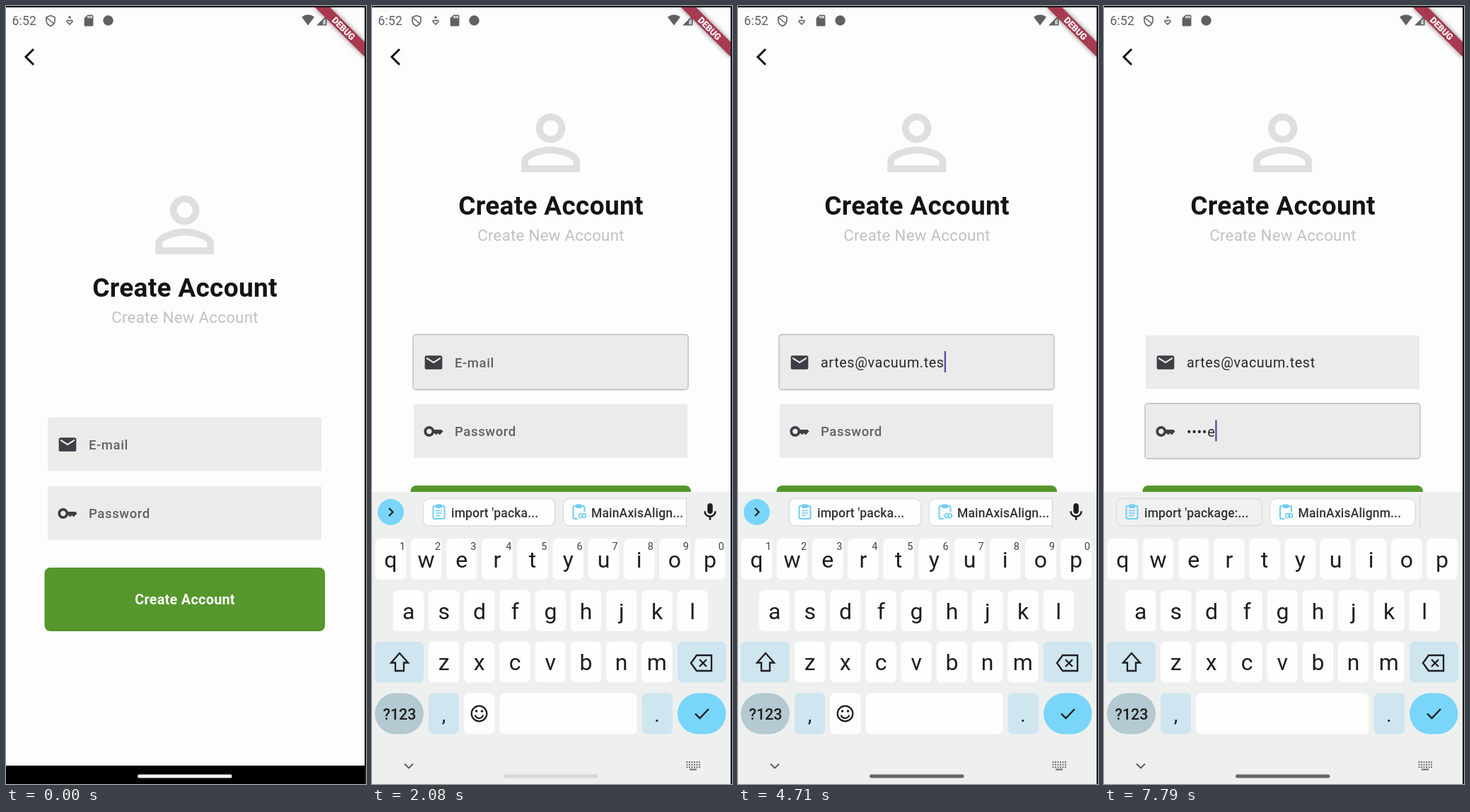
An HTML page with a canvas for the animation above (8 s loop, 509x1100 px).

```html
<!DOCTYPE html>
<html lang="en">
<head>
<meta charset="utf-8">
<title>Create Account</title>
<style>
  html, body { margin: 0; width: 100%; height: 100%; overflow: hidden; background: #fdfdfd; }
  canvas { display: block; }
</style>
</head>
<body>
<canvas id="stage" width="509" height="1100"></canvas>
<script>
const ctx = document.getElementById('stage').getContext('2d');
const LOOP = 8000, SHIFT = 116, KEYBOARD_TOP = 687;
const EMAIL = 'artes@vacuum.test';
const INK = '#1d1e20', BLUE = '#79d5fa', PALE = '#cfe5f0', KEY = '#fdfefd';

const ICONS = {
  person: 'M12 5.9a2.1 2.1 0 110 4.2 2.1 2.1 0 010-4.2m0 9c2.97 0 6.1 1.46 6.1 2.1v1.1H5.9V17c0-.64 3.13-2.1 6.1-2.1M12 4C9.79 4 8 5.79 8 8s1.79 4 4 4 4-1.79 4-4-1.79-4-4-4zm0 9c-2.67 0-8 1.34-8 4v3h16v-3c0-2.66-5.33-4-8-4z',
  mail: 'M20 4H4c-1.1 0-2 .9-2 2v12c0 1.1.9 2 2 2h16c1.1 0 2-.9 2-2V6c0-1.1-.9-2-2-2zm0 4l-8 5-8-5V6l8 5 8-5v2z',
  key: 'M21 10h-8.35C11.83 7.67 9.61 6 7 6c-3.31 0-6 2.69-6 6s2.69 6 6 6c2.61 0 4.83-1.67 5.65-4H13l2 2 2-2 2 2 4-4.04zM7 15c-1.65 0-3-1.35-3-3s1.35-3 3-3 3 1.35 3 3-1.35 3-3 3z',
  mic: 'M12 14c1.66 0 3-1.34 3-3V5c0-1.66-1.34-3-3-3S9 3.340 9 5v6c0 1.660 1.340 3 3 3zm5-3c0 2.760-2.240 5-5 5s-5-2.240-5-5H5c0 3.530 2.610 6.430 6 6.920V21h2v-3.080c3.390-.490 6-3.390 6-6.920z',
  card: 'M18 2h-8L4 8v12c0 1.100.9 2 2 2h12c1.100 0 2-.9 2-2V4c0-1.100-.9-2-2-2zm-6 6h-2V4h2zm3 0h-2V4h2zm3 0h-2V4h2z'
};
for (const name in ICONS) ICONS[name] = new Path2D(ICONS[name]);

const clamp = v => Math.min(1, Math.max(0, v));
const span = (t, from, to) => clamp((t - from) / (to - from));
const easeOut = p => 1 - (1 - p) ** 3;
const easeInOut = p => p * p * (3 - 2 * p);
const countReached = (times, t) => times.filter(at => t >= at).length;

function icon(name, cx, cy, scale, color) {
  ctx.save();
  ctx.translate(cx - 12 * scale, cy - 12 * scale);
  ctx.scale(scale, scale);
  ctx.fillStyle = color;
  ctx.fill(ICONS[name], 'evenodd');
  ctx.restore();
}

function box(x1, y1, x2, y2, r, fill, stroke, width = 1) {
  ctx.beginPath();
  ctx.roundRect(x1, y1, x2 - x1, y2 - y1, r);
  if (fill) { ctx.fillStyle = fill; ctx.fill(); }
  if (stroke) { ctx.strokeStyle = stroke; ctx.lineWidth = width; ctx.stroke(); }
}

function dot(x, y, r, color) {
  ctx.beginPath();
  ctx.arc(x, y, r, 0, Math.PI * 2);
  ctx.fillStyle = color;
  ctx.fill();
}

function line(points, color, width, close = false) {
  ctx.beginPath();
  points.forEach(([x, y]) => ctx.lineTo(x, y));
  if (close) ctx.closePath();
  ctx.strokeStyle = color;
  ctx.lineWidth = width;
  ctx.stroke();
}

function setFont(size, weight, spacing) {
  ctx.font = `${weight} ${size}px Roboto, sans-serif`;
  ctx.letterSpacing = spacing + 'px';
}

function text(str, x, y, size, color, { weight = 400, align = 'left', spacing = 0 } = {}) {
  setFont(size, weight, spacing);
  ctx.textAlign = align;
  ctx.fillStyle = color;
  ctx.fillText(str, x, y);
}

function statusBar() {
  const grey = '#5f6063';
  text('6:52', 8.5, 27, 17.5, grey, { spacing: .2 });
  ctx.strokeStyle = grey;
  ctx.lineWidth = 1.6;
  ctx.stroke(new Path2D('M63 13.500l6 2.300v5q0 5-6 7.700q-6-2.700-6-7.700v-5zM58 17l10 8'));
  ctx.stroke(new Path2D('M90 26l-4-4q0-3 4-1q4-2 4 1z'));
  dot(90, 16, 1.8, grey);
  icon('card', 117, 20.5, .8, grey);
  dot(144.500, 20.5, 7.2, grey);
  ctx.fillStyle = grey;
  ctx.fill(new Path2D('M418 15.500q9-6.500 18 0l-9 12z'));
  ctx.fill(new Path2D('M453.500 13v14.500h-14.500z'));
  ctx.fillStyle = '#c9c9cb';
  ctx.fill(new Path2D('M452 17v9h-4v-5z'));
  line([[39, 61], [28, 72], [39, 83]], '#111', 3);
}

function debugBanner() {
  ctx.save();
  ctx.beginPath();
  ctx.rect(0, 2, 507, 1098);
  ctx.clip();
  ctx.translate(507, 2);
  ctx.rotate(Math.PI / 4);
  ctx.shadowColor = 'rgba(0,0,0,.5)';
  ctx.shadowBlur = 7;
  ctx.fillStyle = '#a83a50';
  ctx.fillRect(-49.4, 34.6, 98.8, 14.8);
  ctx.shadowBlur = 0;
  text('DEBUG', 0, 46.5, 12.6, '#fff', { weight: 900, align: 'center' });
  ctx.restore();
}

function field({ top, bottom, iconName, hint, value, focus, caret }) {
  const mid = (top + bottom) / 2;
  box(59 - focus, top - focus, 446 + focus, bottom + focus, 2 + 2 * focus, '#ebebeb');
  if (focus) {
    ctx.globalAlpha = focus;
    box(58, top - 1, 447, bottom + 1, 4, null, '#b8b8c6', 1.3);
    ctx.globalAlpha = 1;
  }
  icon(iconName, 87, mid + .5, 1.234, '#3f3e45');
  if (value) text(value, 117, mid + 7.5, 19.75, '#28282b', { spacing: .62 });
  else text(hint, 117, mid + 7.300, 18.5, '#616064', { weight: 500, spacing: .62 });
  if (caret) {
    setFont(19.75, 400, .62);
    const x = 117 + (value ? ctx.measureText(value).width : 0);
    ctx.fillStyle = '#5c4fa2';
    ctx.fillRect(x, mid - 15.5, 2.4, 30);
  }
}

function form(t) {
  const emailTimes = [2420, 2600, 2800, 3040, 3420, 4080, 4080, 4080, 4080,
    4157, 4233, 4310, 4387, 4463, 4540, 4710, 4960];
  const typed = countReached([7040, 7290, 7630, 7710, 7790], t);
  const toPassword = span(t, 5880, 6050);

  ctx.save();
  ctx.translate(0, -SHIFT * easeInOut(span(t, 1860, 2040)));
  icon('person', 252.7, 309.5, 5.19, '#dfdfe0');
  text('Create Account', 253, 411, 37, '#141415', { weight: 700, align: 'center', spacing: .31 });
  text('Create New Account', 253, 448, 22.2, '#c1c1c4', { align: 'center', spacing: .31 });
  field({
    top: 581.500, bottom: 657.5, iconName: 'mail', hint: 'E-mail',
    value: EMAIL.slice(0, countReached(emailTimes, t)),
    focus: span(t, 1340, 1450) * (1 - toPassword),
    caret: (t >= 1380 && t < 1880) || (t >= 2420 && t < 5500)
  });
  field({
    top: 679, bottom: 755, iconName: 'key', hint: 'Password',
    value: typed ? '•'.repeat(typed - 1) + 'teste'[typed - 1] : '',
    focus: toPassword,
    caret: (t >= 5880 && t < 6380) || t >= 6880
  });
  box(54.5, 794, 451, 884, 8, '#55972c');
  text('Create Account', 253, 846, 19.75, '#fff', { weight: 700, align: 'center', spacing: .31 });
  ctx.restore();
}

function clipboard(x, linked) {
  box(x - 8, 707, x + 8, 725, 2, null, '#6fcdf3', 2);
  box(x - 4, 704.5, x + 4, 710, 1, '#6fcdf3');
  if (linked) {
    box(x - 2, 715, x + 11, 727, 3, KEY);
    box(x, 717.500, x + 4.5, 723.5, 3, null, '#6fcdf3', 1.7);
    box(x + 5, 717.5, x + 9.5, 723.5, 3, null, '#6fcdf3', 1.7);
  } else {
    for (const y of [713.5, 717, 720.5]) line([[x - 4.5, y], [x + (y > 720 ? 2 : 4.5), y]], '#6fcdf3', 1.6);
  }
}

function chip(x1, x2, label, linked, fill = KEY) {
  box(x1, 696.500, x2, 735, 8, fill, '#d9dddd', 1.3);
  clipboard(x1 + 22, linked);
  text(label, x1 + 39.5, 722.5, 17.5, '#303234', { weight: 500, spacing: .15 });
}

function suggestions(secure, t) {
  if (secure) {
    const shade = 253 - 14 * span(t, 7290, 7420);
    chip(17.500, 223.5, "import 'package:...", false, `rgb(${shade},${shade + 1},${shade + 1})`);
    chip(235, 440, 'MainAxisAlignm...', true);
    line([[447, 692], [447, 740]], '#d3d8da', 1.3);
    return;
  }
  dot(26.5, 715.500, 18.5, BLUE);
  line([[24, 710], [29.5, 715.5], [24, 721]], INK, 2.2);
  chip(72.5, 258.5, "import 'packa...", false);
  ctx.save();
  ctx.beginPath();
  ctx.rect(260, 690, 184, 50);
  ctx.clip();
  chip(270.5, 452, 'MainAxisAlign...', true);
  ctx.restore();
  line([[444.5, 695], [444.5, 740]], '#d3d8da', 1.3);
  icon('mic', 478, 715.5, 1.25, INK);
}

function keyRow(letters, left, top) {
  [...letters].forEach((letter, i) => {
    const x = left + i * 50.2;
    box(x, top, x + 43.5, top + 58, 7, KEY);
    text(letter, x + 21.8, top + 40.5, 32, INK, { align: 'center' });
  });
}

function emoji(x, y) {
  ctx.strokeStyle = INK;
  ctx.lineWidth = 2.2;
  ctx.beginPath();
  ctx.arc(x, y, 10.8, 0, Math.PI * 2);
  ctx.stroke();
  dot(x - 4, y - 3.500, 1.8, INK);
  dot(x + 4, y - 3.5, 1.8, INK);
  ctx.beginPath();
  ctx.arc(x, y + .5, 6, .25, Math.PI - .25);
  ctx.stroke();
}

function keyboard(t) {
  const rise = easeOut(span(t, 1720, 2020));
  if (!rise) return;
  const secure = t >= 6130;
  ctx.save();
  ctx.translate(0, (1100 - KEYBOARD_TOP) * (1 - rise));
  ctx.fillStyle = '#edf0ef';
  ctx.fillRect(0, KEYBOARD_TOP, 507, 1100 - KEYBOARD_TOP);
  suggestions(secure, t);

  keyRow('qwertyuiop', 4.5, 753);
  if (!secure) [...'1234567890'].forEach((digit, i) =>
    text(digit, 43 + i * 50.1, 769, 14.5, '#3f4244', { align: 'center' }));
  keyRow('asdfghjkl', 29.8, 826);
  keyRow('zxcvbnm', 79.8, 898.5);

  box(4, 898.5, 73, 956.5, 7, PALE);
  line([[39, 915], [51, 928.5], [45, 928.5], [45, 940], [33, 940], [33, 928.5], [27, 928.5]], INK, 2.3, true);
  box(432, 898.5, 501, 956.5, 7, PALE);
  line([[451, 929], [459, 918], [480, 918], [480, 940], [459, 940]], INK, 2.3, true);
  line([[463, 924], [473, 934]], INK, 2.3);
  line([[473, 924], [463, 934]], INK, 2.3);

  box(4, 971.5, 73, 1029.5, 29, '#b4c9d1');
  text('?123', 39, 1009, 21.5, INK, { weight: 500, align: 'center' });
  box(80, 971.5, 123, 1029.5, 7, PALE);
  text(',', 101.5, 1012, 28, INK, { align: 'center' });
  if (!secure) {
    box(130, 971.5, 173.5, 1029.5, 7, KEY);
    emoji(151.5, 1000.5);
  }
  box(secure ? 130 : 180.5, 971.5, 374.5, 1029.5, 7, KEY);
  box(381.5, 971.5, 425, 1029.5, 7, PALE);
  text('.', 403, 1012, 28, INK, { align: 'center' });
  box(432, 971.5, 500.5, 1029.5, 29, BLUE);
  line([[457, 1000.5], [463.5, 1007], [476, 994]], INK, 2.4);

  line([[46, 1071.500], [52, 1077.5], [58, 1071.5]], '#55585a', 1.8);
  ctx.fillStyle = '#6a6d6f';
  for (let row = 0; row < 3; row++)
    for (let col = 0; col < 6; col++) ctx.fillRect(444.5 + col * 3.5, 1068 + row * 3.6, 2, 2);
  ctx.fillRect(449, 1078.5, 10, 2);
  ctx.restore();
}

function draw(t) {
  ctx.fillStyle = '#fdfdfd';
  ctx.fillRect(0, 0, 509, 1100);
  form(t);
  statusBar();
  ctx.fillStyle = '#000';
  ctx.fillRect(0, 1074, 509, 26);
  keyboard(t);
  const shade = 242 - 140 * span(t, 2040, 2250);
  box(186, 1086.500, 319.5, 1091.5, 2.5, `rgb(${shade},${shade},${shade})`);
  debugBanner();
  ctx.fillStyle = '#17181c';
  ctx.fillRect(0, 0, 509, 2);
  ctx.fillRect(507, 0, 2, 1100);
}

const start = performance.now();
function tick() {
  draw((performance.now() - start) % LOOP);
  requestAnimationFrame(tick);
}
tick();
</script>
</body>
</html>
```
